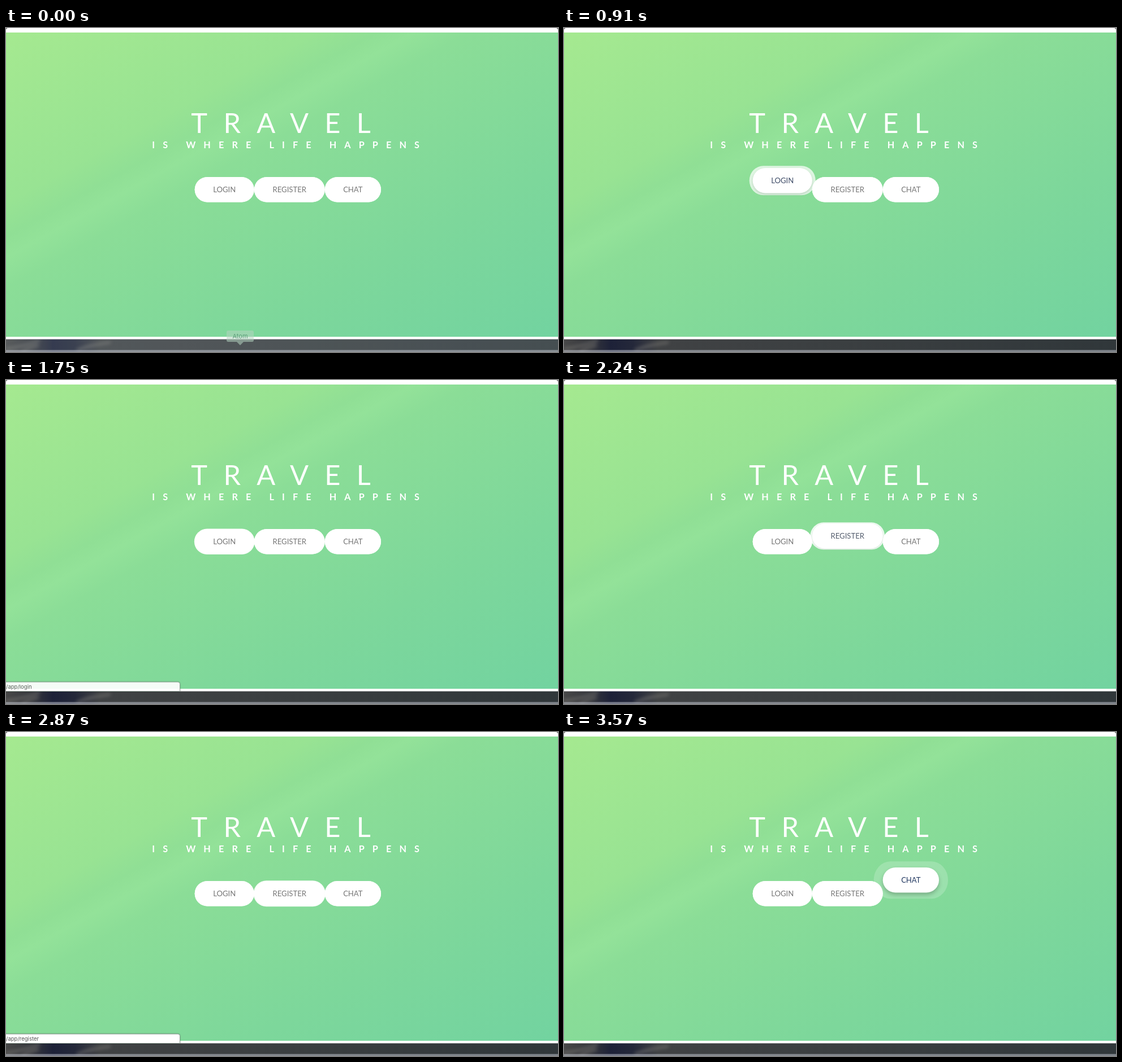
These frames come from a looping animation (976 by 574 pixels, 3640 ms). An HTML page:

```html
<!DOCTYPE html>
<html lang="en">
<head>
<meta charset="utf-8">
<title>Travel</title>
<style>
  html, body { margin: 0; width: 100%; height: 100%; overflow: hidden; background: #fff; }
  .hero { position: absolute; left: 0; top: 8px; width: 976px; height: 539px;
    background: linear-gradient(to bottom right, #a5e990 0%, #98e393 28%, #90df95 33.5%,
      #93e299 37%, #8bdd97 42%, #7dd79b 72%, #72d3a0 100%); }
  svg { position: absolute; left: 0; top: 0; display: block; }
  text { font-family: Lato, sans-serif; fill: #fff; white-space: pre; }
  .title { font-size: 48.75px; letter-spacing: 28.3px; }
  .sub { font-size: 16.25px; font-weight: 700; letter-spacing: 14.1px; }
  .label { font-size: 13.1px; text-anchor: middle; }
  .small { font: 9.5px Inter, sans-serif; fill: #555; }
  .tip { font: 11px Inter, sans-serif; fill: #5f9f7c; text-anchor: middle; }
</style>
</head>
<body>
<div class="hero"></div>
<svg width="976" height="574" viewBox="0 0 976 574">
  <defs>
    <linearGradient id="sky">
      <stop offset="0" stop-color="#484848"/>
      <stop offset=".05" stop-color="#34363c"/>
      <stop offset=".085" stop-color="#1d2138"/>
      <stop offset=".125" stop-color="#24283a"/>
      <stop offset=".17" stop-color="#404244"/>
      <stop offset=".5" stop-color="#3b3f41"/>
      <stop offset="1" stop-color="#30373a"/>
    </linearGradient>
    <filter id="soft" x="-50%" y="-100%" width="200%" height="300%"><feGaussianBlur stdDeviation="3"/></filter>
    <clipPath id="strip"><path d="M0 551.5H976V574H0z"/></clipPath>
  </defs>

  <g clip-path="url(#strip)">
    <path d="M0 551H976V574H0z" fill="url(#sky)"/>
    <g filter="url(#soft)" fill="none" stroke="#85837f" stroke-width="4" opacity=".6">
      <path d="M0 568Q25 566 60 553M125 571Q150 561 185 557M28 574Q40 566 58 562"/>
    </g>
    <path id="glow" d="M0 551H976V574H0z" fill="#a9bcc2"/>
    <path d="M0 570.5H976V574H0z" fill="#cdd2dc" opacity=".5"/>
  </g>
  <path d="M0 0H4Q0 0 0 4zM976 0H972Q976 0 976 4z" fill="#555"/>

  <text class="title" x="327.3" y="186.3">TRAVEL</text>
  <text class="sub" x="258.3" y="212.5">IS WHERE LIFE HAPPENS</text>
  <g id="halos" fill="#fff"></g>
  <g id="buttons"></g>

  <g id="status">
    <path d="M-2 535H304Q307.5 535 307.5 538.5V551.5H-2z" fill="#fff" stroke="#8c9c92"
      style="filter:drop-shadow(0 0 1px #0004)"/>
    <text class="small" id="link" x="0" y="547"></text>
  </g>
  <g id="tip">
    <path d="M393 536H435Q438 536 438 539V553Q438 556 435 556H420L414 562L408 556H393Q390 556 390 553V539Q390 536 393 536z"
      fill="#b4d3c0" opacity=".55"/>
    <text class="tip" x="414" y="550">Atom</text>
  </g>
</svg>
<script>
const LOOP = 3640, STEP = 70, LIFT = 24, TOP = 264, HEIGHT = 44.5;
const $ = id => document.getElementById(id);
const clamp = v => Math.min(1, Math.max(0, v));

// CSS "ease": cubic-bezier(.25, .1, .25, 1)
function ease(x) {
  x = clamp(x);
  let lo = 0, hi = 1, u = x;
  for (let i = 0; i < 24; i++) {
    u = (lo + hi) / 2;
    const bx = .75 * u * (1 - u) + u ** 3;
    if (bx < x) lo = u; else hi = u;
  }
  return .3 * u * (1 - u) ** 2 + 3 * u * u * (1 - u) + u ** 3;
}

// Hover transition that reverses from wherever it got to
function hover(t, b, length) {
  if (t < b.shown) return 0;
  if (t < b.leave) return ease((t - b.enter) / length);
  const peak = ease((b.leave - b.enter) / length);
  return peak * (1 - ease((t - b.leave) / (length * peak)));
}

function add(parent, tag, attrs) {
  const el = document.createElementNS("http://www.w3.org/2000/svg", tag);
  for (const k in attrs) el.setAttribute(k, attrs[k]);
  return parent.appendChild(el);
}

const buttons = [
  { name: "LOGIN", x: 333.7, w: 105.1, enter: 793, shown: 910, leave: 1308 },
  { name: "REGISTER", x: 438.8, w: 124.9, enter: 2165, shown: 2165, leave: 2505 },
  { name: "CHAT", x: 563.7, w: 99.3, enter: 3267, shown: 3267, leave: LOOP }
];
for (const b of buttons) {
  const box = { x: b.x, y: TOP, width: b.w, height: HEIGHT, rx: HEIGHT / 2 };
  b.cx = b.x + b.w / 2;
  b.halo = add($("halos"), "rect", box);
  b.group = add($("buttons"), "g", {});
  b.face = add(b.group, "rect", { ...box, fill: "#fff" });
  b.label = add(b.group, "text", { class: "label", x: b.cx, y: 290.9 });
  b.label.textContent = b.name;
}

const mix = (a, b, k) => a + (b - a) * k;

function draw(t) {
  let status = 0;
  for (const b of buttons) {
    const up = hover(t, b, 300), out = hover(t, b, 600);
    const cy = TOP + HEIGHT / 2, dy = -LIFT * up;
    b.group.setAttribute("transform", `translate(0 ${dy})`);
    b.face.style.filter = up > .01 ? `drop-shadow(0 ${4 * up}px ${3.5 * up}px rgba(0,0,0,${.22 * up}))` : "none";
    b.label.style.fill = `rgb(${mix(119, 36, up)},${mix(119, 58, up)},${mix(119, 98, up)})`;
    b.halo.setAttribute("transform",
      `translate(${b.cx} ${cy + dy}) scale(${1 + .4 * out} ${1 + .6 * out}) translate(${-b.cx} ${-cy})`);
    b.halo.setAttribute("opacity", 1 - out);

    const seen = clamp((t - b.enter - 310) / 100) * (1 - clamp((t - b.leave - 430) / 150));
    if (seen > 0) {
      status = seen;
      $("link").textContent = "/app/" + b.name.toLowerCase();
    }
  }
  $("status").setAttribute("opacity", status);
  const fade = 1 - clamp(t / 210);
  $("tip").setAttribute("opacity", fade);
  $("glow").setAttribute("opacity", .17 * fade);
}

function frame() {
  draw(Math.floor(performance.now() % LOOP / STEP) * STEP);
  requestAnimationFrame(frame);
}
frame();
</script>
</body>
</html>
```
